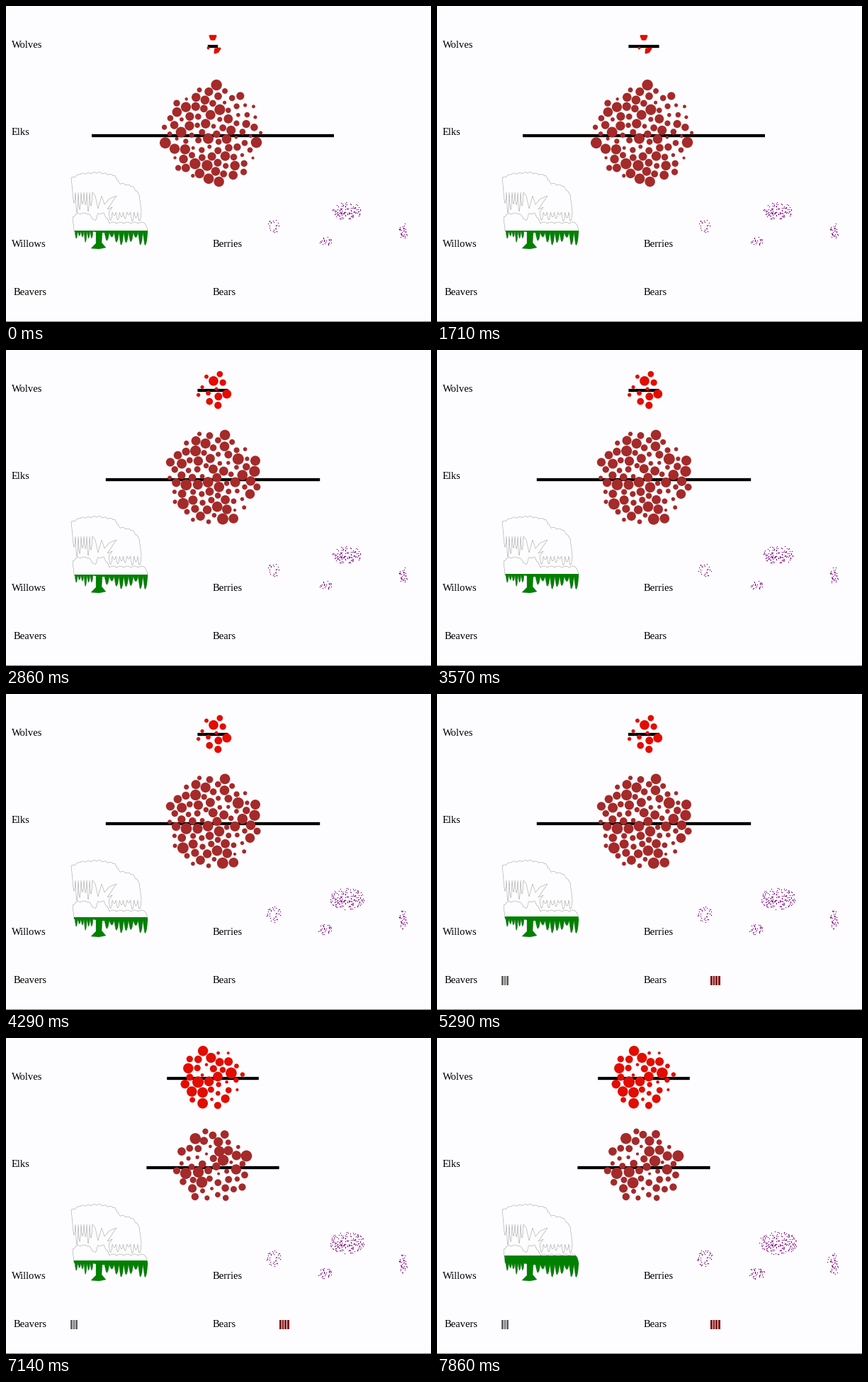
Recreate the animation shown at these times as a matplotlib script. Size 600x446 px, loop 8 s.

```python
import math
import numpy as np
import matplotlib.pyplot as plt
from matplotlib.animation import FuncAnimation
from matplotlib.patches import Polygon, Rectangle

W, H, DPI = 600, 446, 100
PX = 72 / DPI
FRAMES, INTERVAL = 160, 50
STEPS_PER_SECOND = 7
CENTER_X, WOLF_Y, ELK_Y = 292, 55, 181
RED, BROWN, PURPLE, GREEN = "#e30c00", "#a52a2a", "#800080", "#008000"
GOLDEN = math.pi * (3 - math.sqrt(5))


def ease(t, start, end):
    p = min(max((t - start) / (end - start), 0), 1)
    return p * p * (3 - 2 * p)


def mix(a, b, p):
    return a + (b - a) * p


class Herd:
    """Circles of random size on a sunflower spiral that push each other apart."""

    def __init__(self, count, cy, seed):
        self.radii = np.random.default_rng(seed).uniform(2, 8, count)
        i = np.arange(count)
        dist, angle = 7.15 * np.sqrt(i + 0.5), i * GOLDEN
        self.start = np.column_stack([CENTER_X + dist * np.cos(angle),
                                      cy + dist * np.sin(angle)])
        self.rest = self.relax(self.start.copy())
        self.sizes = (2 * self.radii * PX) ** 2

    def relax(self, pos):
        reach = self.radii[:, None] + self.radii + 0.6
        weight = self.radii ** 2 / (self.radii[:, None] ** 2 + self.radii ** 2)
        for _ in range(40):
            delta = pos[:, None] - pos
            gap = np.hypot(delta[..., 0], delta[..., 1])
            np.fill_diagonal(gap, 1e6)
            push = np.clip(reach - gap, 0, None) / gap * weight * 0.5
            pos += (delta * push[..., None]).sum(axis=1)
        return pos

    def show(self, dots, settled):
        dots.set_offsets(mix(self.start, self.rest, settled))
        dots.set_sizes(self.sizes)


def scallops(points, bumps, height):
    """A path through key points, bulging upward in small bumps."""
    xs, ys = np.array(points, float).T
    along = np.concatenate([[0], np.cumsum(np.hypot(np.diff(xs), np.diff(ys)))])
    s = np.linspace(0, along[-1], bumps * 6 + 1)
    lift = height * np.abs(np.sin(bumps * math.pi * s / along[-1]))
    return list(zip(np.interp(s, along, xs), np.interp(s, along, ys) - lift))


def fringe(rng, x0, x1, base, low, count):
    """Hanging twigs of random length from x0 to x1."""
    edges = np.linspace(x0, x1, count + 1)
    out = []
    for a, b in zip(edges, edges[1:]):
        tip = mix(base, low, rng.uniform(0.25, 1))
        out += [(a, base), (mix(a, b, 0.2), mix(base, tip, 0.7)), (mix(a, b, 0.45), tip),
                (mix(a, b, 0.65), tip - 1), (mix(a, b, 0.85), mix(base, tip, 0.4))]
    return out + [(x1, base)]


def willow():
    rng = np.random.default_rng(4)
    crown = scallops([(94, 262), (92, 244), (105, 238), (130, 236), (153, 240),
                      (160, 251), (178, 255), (188, 267), (191, 290)], 19, 1.8)
    crown += fringe(rng, 191, 145, 291, 304, 9)
    crown += [(150, 284), (143, 287), (156, 268), (146, 272), (139, 280), (135, 268),
              (130, 286), (126, 268)]
    crown += fringe(rng, 122, 94, 263, 292, 7)

    skirt = scallops([(96, 317), (94, 299), (101, 294), (116, 294), (126, 305), (130, 294),
                      (138, 294), (146, 307), (196, 307), (200, 317)], 15, 2)
    skirt += fringe(rng, 200, 139, 320, 338, 9)
    skirt += [(136, 320), (135, 334), (141, 341), (131, 343), (120, 342), (127, 335), (127, 319)]
    skirt += fringe(rng, 123, 97, 318, 334, 6)
    return crown, skirt


def berry_bushes():
    """Points of every bush with their relative distance from its middle."""
    rng = np.random.default_rng(11)
    spots, reach = [], []
    for cx, cy, rx, ry, n in [(481.5, 289, 27, 17, 190), (378, 310.5, 11, 12.5, 48),
                              (451, 332, 11.5, 8.5, 40), (562, 318, 11, 15, 64)]:
        rho, phi = np.sqrt(rng.random(n)), rng.random(n) * 2 * math.pi
        spots.append(np.column_stack([cx + rx * rho * np.cos(phi), cy + ry * rho * np.sin(phi)]))
        reach.append(rho)
    spots, reach = np.concatenate(spots), np.concatenate(reach)
    inside = spots[:, 0] < 566
    return spots[inside], reach[inside]


fig = plt.figure(figsize=(W / DPI, H / DPI), dpi=DPI, facecolor="#fdfdff")
ax = fig.add_axes([0, 0, 1, 1], xlim=(0, W), ylim=(H, 0))
ax.axis("off")

for word, x, y in [("Wolves", 8, 59), ("Elks", 8, 181.6), ("Willows", 8, 339.6),
                   ("Beavers", 11, 408.2), ("Berries", 292, 339.6), ("Bears", 292, 408.2)]:
    ax.text(x, y, word, family="Liberation Serif", size=14.6 * PX, color="black")
ax.plot([0, W], [445.3, 445.3], color="#777777", lw=1 * PX)


def make_bar():
    return ax.plot([], [], color="black", lw=4.3 * PX, solid_capstyle="butt", snap=False)[0]


def set_bar(line, y, count):
    half = 1.8 * count
    line.set_data([CENTER_X - half, CENTER_X + half], [y, y])


wolf_bar, elk_bar = make_bar(), make_bar()
wolf_dots = ax.scatter([], [], color=RED, lw=0, zorder=3)
elk_dots = ax.scatter([], [], color=BROWN, lw=0, zorder=3)
wolf_pack, wolf_crowd = Herd(12, WOLF_Y, 3), Herd(36, WOLF_Y, 5)
elk_many, elk_fewer, elk_few = (Herd(n, ELK_Y, n) for n in (95, 84, 52))

# The first three wolves are squeezed out of round.
blobs = [ax.add_patch(Polygon(corners, color=RED, lw=3 * PX, joinstyle="round", zorder=3))
         for corners in ([(288, 42.3), (296, 42.3), (294, 47), (290, 47)],
                         [(295, 66), (295.5, 61), (302, 60), (299, 64.5)],
                         [(285, 59), (286, 59), (285.5, 60)])]

crown, skirt = willow()
for outline in (crown, skirt):
    ax.add_patch(Polygon(outline, fill=False, ec="#a8a8a8", lw=0.6 * PX))
leaves = ax.add_patch(Polygon(skirt, fc=GREEN, lw=0, zorder=3))

berry_spots, berry_reach = berry_bushes()
berries = ax.scatter([], [], s=(1.35 * PX) ** 2, color=PURPLE, lw=0, snap=False)

newcomers = [ax.add_patch(Rectangle((x + 3.6 * i, 397.5), 2.8, 13.5, color=color, lw=0))
             for x, n, color in ((91, 3, "#696969"), (386, 4, "#800000")) for i in range(n)]


def update(frame):
    t = (STEPS_PER_SECOND * frame + 5) // 20 / STEPS_PER_SECOND

    set_bar(wolf_bar, 57, 4 + 8 * ease(t, 0.95, 1.65) + 24 * ease(t, 5.24, 5.95))
    set_bar(elk_bar, 183, 95 - 11 * ease(t, 2.0, 2.5) - 32 * ease(t, 6.3, 6.78))

    for blob in blobs:
        blob.set_visible(t < 1.8)
    wolf_dots.set_visible(t >= 1.8)
    if t < 6.1:
        wolf_pack.show(wolf_dots, ease(t, 1.7, 2.5))
    else:
        wolf_crowd.show(wolf_dots, ease(t, 5.8, 6.7))

    if t < 2.4:
        elk_many.show(elk_dots, 1)
    elif t < 6.7:
        elk_fewer.show(elk_dots, ease(t, 2.3, 3.1))
    else:
        elk_few.show(elk_dots, ease(t, 6.6, 7.8))

    first, second = ease(t, 3.2, 4.45), ease(t, 7.3, 8.1)
    level = 317 - 2.6 * first - 9.3 * second
    leaves.set_clip_path(Rectangle((0, level + 100), W, -100, transform=ax.transData))
    berries.set_offsets(berry_spots[berry_reach < 0.76 + 0.16 * first + 0.1 * second])

    for patch in newcomers:
        patch.set_visible(t >= 4.5)
    return []


anim = FuncAnimation(fig, update, frames=FRAMES, interval=INTERVAL, repeat=True, repeat_delay=0)
plt.show()
```
